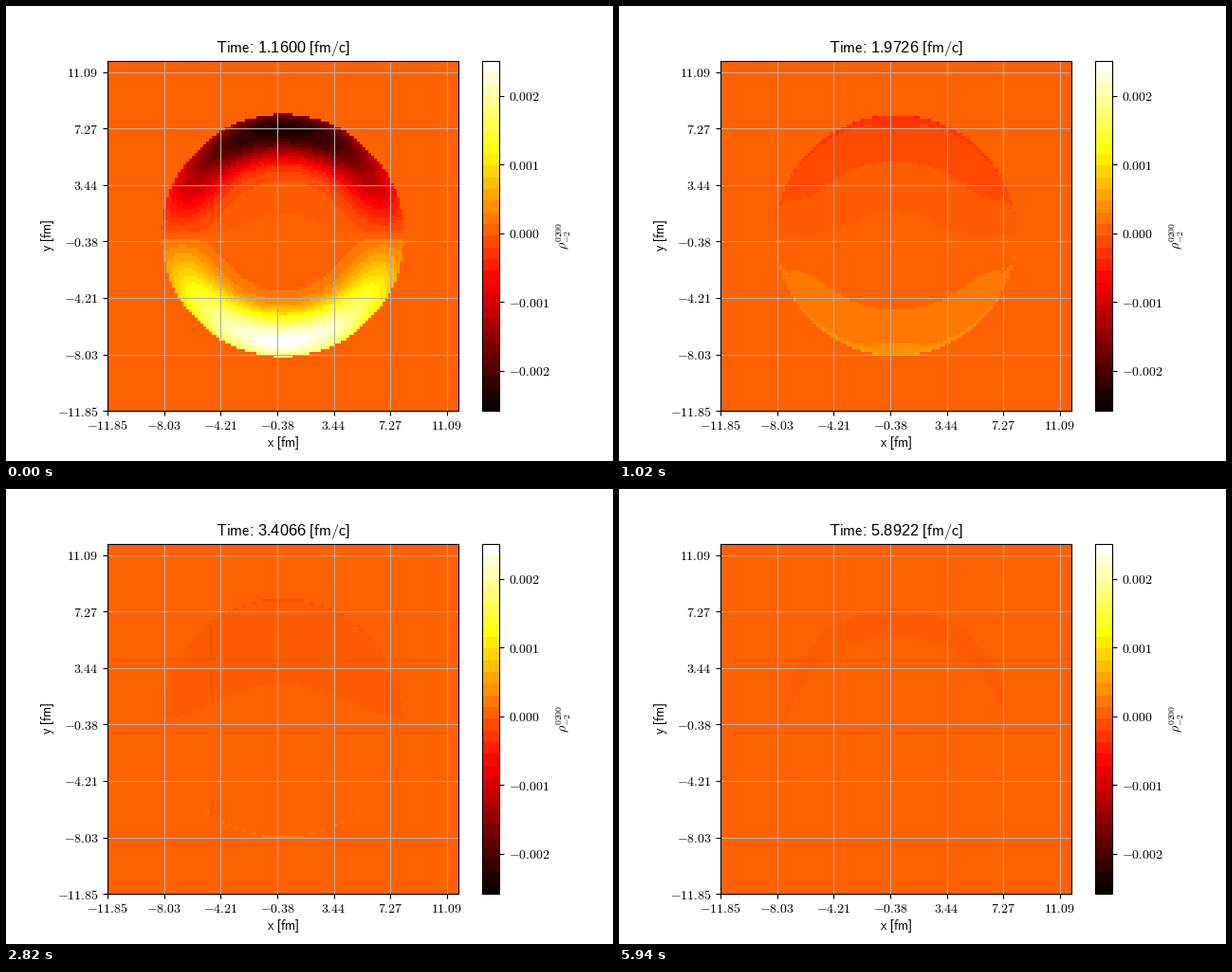
A matplotlib script that plays this animation: 640x480 px, repeating every 6 s.

```python
import numpy as np
import matplotlib.pyplot as plt
from matplotlib.animation import FuncAnimation
from matplotlib.cm import ScalarMappable
from matplotlib.colors import ListedColormap, Normalize

plt.rcParams.update({
    "font.family": "Liberation Sans",
    "mathtext.fontset": "cm",
})

FRAMES, INTERVAL = 100, 60
START, TIME_STEP = 1.16, 0.0478          # fm/c
HALF, CELLS, BANDS = 11.854, 125, 30     # HALF in fm
VMIN, VMAX = -2.589e-3, 2.51e-3
BAND = (VMAX - VMIN) / BANDS
ZERO, FAINT = BANDS // 2, BANDS          # colour indices: zero band, faint halo

edges = np.linspace(-HALF, HALF, CELLS + 1)
centres = (edges[1:] + edges[:-1]) / 2
X, Y = np.meshgrid(centres, centres)
RADIUS = np.hypot(X, Y)
SINE = Y / np.maximum(RADIUS, 1e-9)


def clock(frame):
    return START + TIME_STEP * frame


def field(frame):
    """Dipole on a Gaussian ring plus a sharp rim, cut at the disc's edge."""
    time = clock(frame)
    age = time - START
    grow = min(age / 1.25, 1)
    centre, width = 7.1 + 0.9 * grow**2, 1.3 + 0.45 * grow
    bulk = 1.95e-3 * np.exp(-4 * age) + 4.5e-4 * (START / time) ** 1.7
    ring = bulk * np.exp(-((RADIUS - centre) / width) ** 2 / 2)
    rim = 8.3e-3 * age / time**5 * np.exp((np.minimum(RADIUS, 8.3) - 8.09) / 0.12)
    cut = max(8.18 - 0.05 * age, 8.09)
    return np.where(RADIUS < cut, -SINE * (ring + rim), 0)


def halo(frame):
    """Faint upper half disc that thins to a crescent as a hill rises below."""
    u = frame / (FRAMES - 1)
    height = 1.5 + 1.2 * u + 2.9 * u**3
    power = 0.55 + 5.5 / (1 + (u / 0.36) ** 4)
    width = 8.25 - 0.95 * u**2
    hill = height * np.clip(1 - (X / width) ** 2, 0, 1) ** power
    return (RADIUS < 8.15 - 0.7 * u**3) & (Y > np.maximum(hill, 0.1))


def bands(frame):
    index = np.clip(np.rint(field(frame) / BAND) + ZERO, 0, BANDS - 1)
    index[(index == ZERO) & halo(frame)] = FAINT
    return index


def title_text(frame):
    return rf"$\mathsf{{Time}}$: {clock(frame):.4f} [$\mathsf{{fm/c}}$]"


def axis_text(name):
    return rf"$\mathsf{{{name}}}$ [$\mathsf{{fm}}$]"


shades = np.linspace(0, 1, BANDS)
shades[1:-1] -= 0.006
colours = plt.get_cmap("hot", 2048)(shades)
faint = [[1, 92 / 255, 0, 1]]

fig, ax = plt.subplots(figsize=(6.4, 4.8), dpi=100)
image = ax.imshow(bands(0), origin="lower", interpolation="nearest",
                  extent=(-HALF, HALF, -HALF, HALF),
                  cmap=ListedColormap(np.vstack([colours, faint])),
                  vmin=-0.5, vmax=BANDS + 0.5)

scale = ScalarMappable(Normalize(VMIN, VMAX), ListedColormap(colours))
bar = fig.colorbar(scale, ax=ax)
bar_ticks = np.arange(-2, 3) * 1e-3
bar.set_ticks(bar_ticks, labels=[f"${v:.3f}$" for v in bar_ticks])
bar.set_label(r"$\rho^{0200}_{-2}$")

ticks = np.linspace(-HALF, HALF, CELLS)[::20]
labels = [f"${v:.2f}$" for v in ticks]
ax.set_xticks(ticks, labels)
ax.set_yticks(ticks, labels)
ax.tick_params(axis="x", pad=2.8)
ax.set_xlabel(axis_text("x"), labelpad=1.8)
ax.set_ylabel(axis_text("y"), labelpad=0.4)
ax.grid(True)
title = ax.set_title(title_text(0), fontsize=11.75)


def update(frame):
    image.set_data(bands(frame))
    title.set_text(title_text(frame))
    return image, title


anim = FuncAnimation(fig, update, frames=FRAMES, interval=INTERVAL,
                     repeat=True, repeat_delay=0, blit=False)
plt.show()
```
